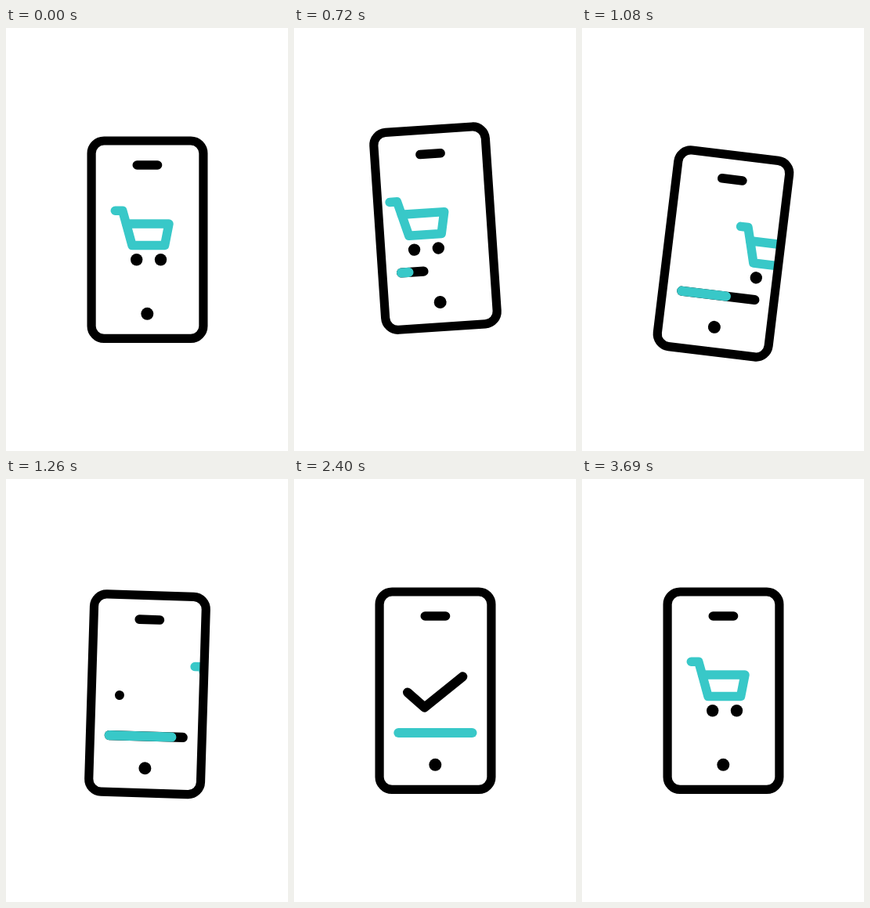
An HTML page with a canvas that plays this animation: 360x540 px, repeating every 3.84 s.

```html
<!DOCTYPE html>
<html lang="en">
<head>
<meta charset="utf-8">
<title>Mobile checkout</title>
<style>
  html, body { margin: 0; width: 100%; height: 100%; overflow: hidden; background: #fff; }
  canvas { display: block; width: 360px; height: 540px; }
</style>
</head>
<body>
<canvas id="stage"></canvas>
<script>
const LOOP = 3840;
const BLACK = '#000', TEAL = '#38c8c8';
const CENTER = { x: 180.4, y: 270 };
const BAR = { left: 133.4, right: 227.4, y: 324 };
const CHECK = [[145, 272.5], [166.6, 291.6], [215.3, 252.3]];

const canvas = document.getElementById('stage');
const ctx = canvas.getContext('2d');
const ratio = window.devicePixelRatio || 1;
canvas.width = 360 * ratio;
canvas.height = 540 * ratio;

const easeInOut = power => x =>
  x < 0.5 ? (2 * x) ** power / 2 : 1 - (2 - 2 * x) ** power / 2;
const quad = easeInOut(2), cubic = easeInOut(3);

const mix = (a, b, p) => a + (b - a) * p;
const progress = (t, start, end, ease = quad) =>
  ease(Math.min(1, Math.max(0, (t - start) / (end - start))));

// Values along consecutive segments: [start, end, from, to, ease]
function track(t, segments) {
  let value = segments[0][2];
  for (const [start, end, from, to, ease] of segments) {
    if (t >= start) value = mix(from, to, progress(t, start, end, ease));
  }
  return value;
}

const sway = (t, low, high) => track(t, [
  [0, 600, 0, low, quad],
  [600, 1020, low, high, cubic],
  [1020, 1420, high, 0, cubic]
]);

const cartShift = t => track(t, [
  [0, 660, 0, -16.5, quad],
  [660, 1440, -16.5, 114.5, quad],
  [2785, 3680, -118, 0, quad]
]);

function stroke(points, color, width, closed) {
  ctx.beginPath();
  points.forEach(([x, y]) => ctx.lineTo(x, y));
  if (closed) ctx.closePath();
  ctx.strokeStyle = color;
  ctx.lineWidth = width;
  ctx.stroke();
}

function dot(x, y, r) {
  ctx.beginPath();
  ctx.arc(x, y, r, 0, Math.PI * 2);
  ctx.fillStyle = BLACK;
  ctx.fill();
}

function phoneOutline() {
  ctx.beginPath();
  ctx.roundRect(109.1, 144, 142.8, 252.4, 16);
}

function drawCart(shift) {
  ctx.save();
  phoneOutline();
  ctx.clip();
  ctx.translate(shift, 0);
  stroke([[139.3, 233.2], [148.8, 233.2], [153.5, 250]], TEAL, 11.5);
  stroke([[153.5, 250], [208, 250], [202.6, 277.5], [161, 277.5]], TEAL, 11.5, true);
  dot(166.7, 295.8, 7.7);
  dot(197.5, 295.8, 7.7);
  ctx.restore();
}

function drawBar(from, to, color) {
  const at = p => [mix(BAR.left, BAR.right, p), BAR.y];
  stroke([at(from), at(to)], color, 12.2);
}

// Part of the check mark between two fractions of its length
function drawCheck(from, to) {
  const [a, b, c] = CHECK;
  const first = Math.hypot(b[0] - a[0], b[1] - a[1]);
  const second = Math.hypot(c[0] - b[0], c[1] - b[1]);
  const bend = first / (first + second);
  const at = p => {
    const [u, v, q] = p < bend ? [a, b, p / bend] : [b, c, (p - bend) / (1 - bend)];
    return [mix(u[0], v[0], q), mix(u[1], v[1], q)];
  };
  const points = [at(from)];
  if (from < bend && to > bend) points.push(b);
  points.push(at(to));
  stroke(points, BLACK, 12);
}

function draw(t) {
  ctx.setTransform(ratio, 0, 0, ratio, 0, 0);
  ctx.fillStyle = '#fff';
  ctx.fillRect(0, 0, 360, 540);
  ctx.lineCap = ctx.lineJoin = 'round';

  ctx.translate(CENTER.x, CENTER.y + sway(t, -18, 18));
  ctx.rotate(sway(t, -5, 7) * Math.PI / 180);
  ctx.translate(-CENTER.x, -CENTER.y);

  if (t < 1440 || t >= 2785) drawCart(cartShift(t));

  if (t >= 480 && t < 1560) drawBar(0, progress(t, 480, 1100), BLACK);
  if (t >= 480 && t < 3540) {
    drawBar(progress(t, 2475, 3540), progress(t, 480, 1560), TEAL);
  }
  if (t >= 1230 && t < 3150) {
    drawCheck(progress(t, 2400, 3120), progress(t, 1260, 1950));
  }

  phoneOutline();
  ctx.strokeStyle = BLACK;
  ctx.lineWidth = 11.2;
  ctx.stroke();
  stroke([[167.3, 175], [193.5, 175]], BLACK, 11.6);
  dot(180.3, 364.8, 8);
}

function tick() {
  draw(performance.now() % LOOP);
  requestAnimationFrame(tick);
}
tick();
</script>
</body>
</html>
```
